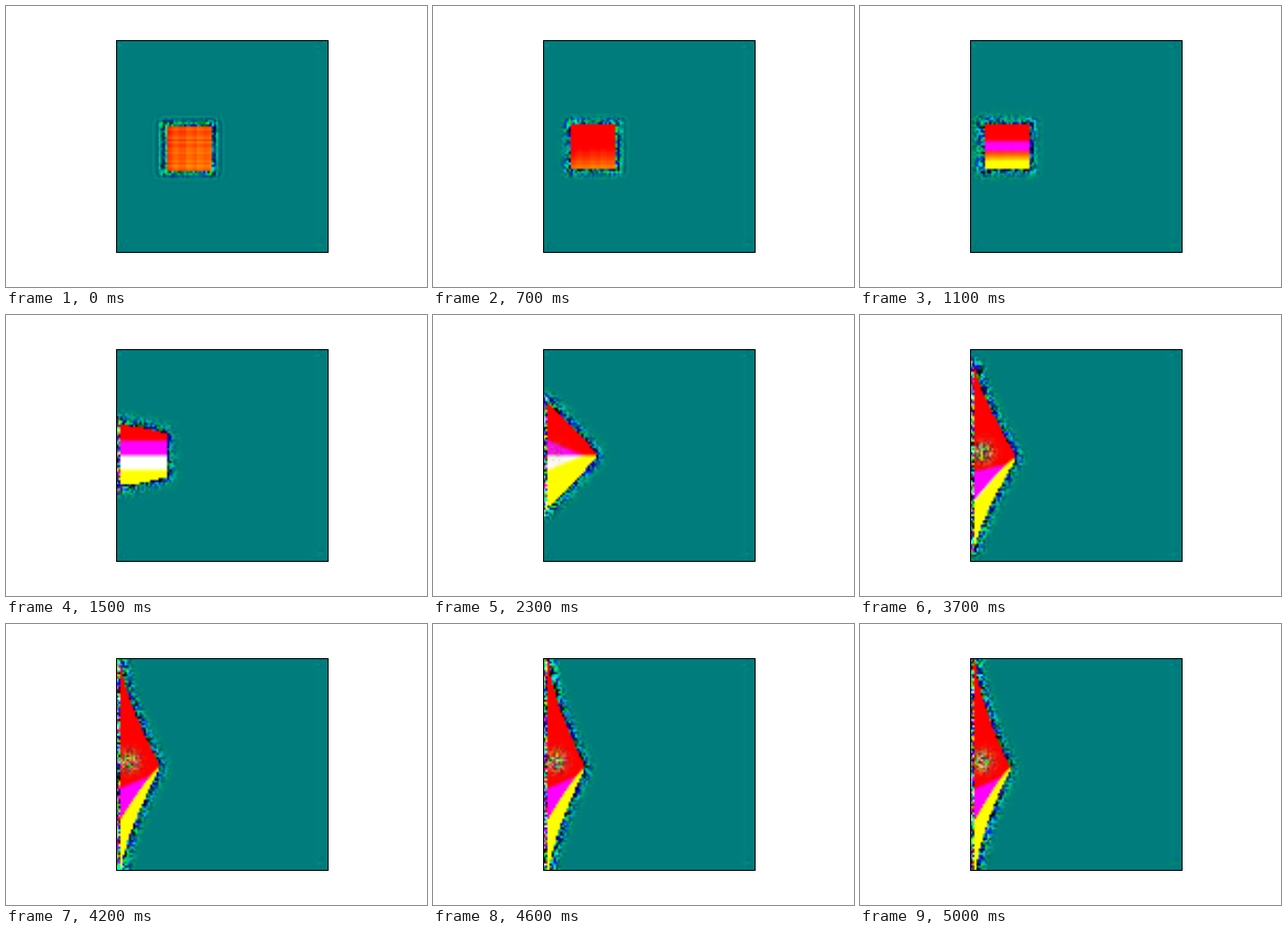
A matplotlib script for the animation above (5.1 s loop, 432 by 288 pixels).

```python
import numpy as np
import matplotlib.pyplot as plt
from matplotlib.animation import FuncAnimation

W, H, DPI = 432, 288, 72
FRAMES, STEP = 51, 100
N = 100
LEFT, TOP, SIDE = 112.68, 34.56, 217.44
CELL = SIDE / N
BASE = 0.488
WALL, START, BLOCK = 118, 164, 46
SPEED = 3.3
HIT = (START - WALL) / SPEED

cells = (np.arange(N) + 0.5) * CELL
X, Y = np.meshgrid(LEFT + cells, TOP + cells)

rng = np.random.default_rng(12)
phase = rng.uniform(0, 2 * np.pi, (3, N, N))
rate = rng.uniform(0.15, 0.5, (3, N, N))
row_tex = rng.uniform(-1, 1, N)
col_tex = rng.uniform(-1, 1, N)


def ease(t, start, end):
    u = np.clip((t - start) / (end - start), 0, 1)
    return u * u * (3 - 2 * u)


def bell(d, width):
    return np.exp(-(d / width) ** 2)


class Block:
    """Outline of the block: a square that flattens along the wall."""

    def __init__(self, t):
        self.left = max(WALL, START - SPEED * t)
        self.tip = (self.left + BLOCK if t < HIT
                    else np.interp(t, [HIT, 20, 50], [164, 167.5, 153]))
        self.cy = 146 - 2 * ease(t, 0, 10) + 0.15 * max(t - 22, 0)
        self.half = min(22.5 + 2.7 * max(t - 12, 0), 110)
        self.edge = 22.5 - 20 * ease(t, HIT, 24)
        self.power = 0.6 + np.exp(-(t - 15) / 13)
        self.s = np.clip((X - self.left) / (self.tip - self.left), 0, 1)
        self.inside = ((X >= self.left) & (X <= self.tip)
                       & (np.abs(Y - self.cy) <= self.height(self.s)))

    def height(self, s):
        return self.half + (self.edge - self.half) * s ** self.power

    def distance(self):
        """Distance from every cell to the outline."""
        s = np.linspace(0, 1, 13) ** 1.5
        x, h = self.left + s * (self.tip - self.left), self.height(s)
        px = np.r_[x, x[::-1]]
        py = self.cy + np.r_[-h, h[::-1]]
        best = np.full(X.shape, 1e9)
        for x0, y0, x1, y1 in zip(px, py, np.roll(px, -1), np.roll(py, -1)):
            dx, dy = x1 - x0, y1 - y0
            u = np.clip(((X - x0) * dx + (Y - y0) * dy)
                        / (dx * dx + dy * dy), 0, 1)
            best = np.minimum(best, np.hypot(X - x0 - u * dx, Y - y0 - u * dy))
        return best


def background():
    """Teal field with faint ripples in the corners and on the right."""
    g = np.full((N, N), BASE)
    b = np.full((N, N), BASE)
    for field, ripple in ((g, phase[0]), (b, phase[1])):
        field[3:97, 94:96] += 0.012
        for cx in (118, 321):
            for cy in (41, 245):
                spot = bell(np.hypot(X - cx, Y - cy), 5)
                field += 0.07 * spot * np.sin(ripple)
    return g, b


def outside_colours(t, block, noise):
    """Ringing around the block: stripes at first, speckle later."""
    n0, n1, n2 = noise
    d = block.distance()
    late = min(t / HIT, 1)
    early = 1 - late
    g, b = background()

    gap_x = np.abs(X - (block.left + block.tip) / 2) - BLOCK / 2
    gap_y = np.abs(Y - block.cy) - block.half
    corner = bell(np.hypot(gap_x, gap_y), 7)
    beside = gap_x > gap_y
    wave = np.cos(2 * np.pi * d / 6.5) * bell(d, 9)
    force = early * np.where(beside, 0.6, 0.28)
    turn = ease(t, 0, 8) * np.where(X < block.left, -1, 0.5)
    g += force * wave * np.where(beside, 0.8 + turn, -1)
    b += force * wave * np.where(beside, 0.2 - 0.5 * turn, 0.8)

    # Rough by the wall, smoother towards the tip
    rough = 0.5 + 0.5 * np.exp(-np.clip(X - WALL, 0, None) / 14)
    width = 5.5 + 4 * late * rough
    speckle = bell(d, width) * (late * rough
                                + early * np.clip(1.3 * corner + 0.35, 0, 1))
    edge = late * bell(d, 3.2)
    ring = late * bell(d - 6, 2.5)
    g += 0.9 * speckle * n0 - 0.4 * edge + 0.04 * ring
    b += 0.9 * speckle * n1 - 0.1 * edge + 0.12 * ring
    r = 2 * late * speckle * np.clip(n2 - 0.8, 0, 1)
    halo = 0.03 * late * bell(d - 11, 4)
    g += halo
    b -= halo

    strip = ease(t, 11, 17) * ((X < WALL) & (np.abs(Y - block.cy)
                                             < block.half + 10))
    r += strip * (0.1 + 0.9 * n2)
    g += strip * 0.6 * n0
    b += strip * 0.6 * n1
    return r, g, b


def inside_colours(t, block, noise, shift):
    """Colour bands that sharpen, tilt down the wall and swirl."""
    n0, n1, n2 = noise
    early = max(1 - t / HIT, 0)
    s, y = block.s, Y - block.cy
    sink = ease(t, 24, 42)

    slope = min(0.003 * np.exp(0.3 * t), 0.5)
    g = 0.5 + slope * (y - 46 * early - 52 * sink * (1 - s) ** 1.2)
    plaid = row_tex[:, None] + np.roll(col_tex, shift)
    g += early * (0.1 * plaid - 0.2 * bell(X - block.left, 4))

    band = 20 * ease(t, 8, HIT) * (1 - s * ease(t, 15, 23)) - 5
    b = 0.5 + 0.25 * (band - np.abs(y - 36 * sink * (1 - s)))
    b += (X < WALL + 4.5) & (Y < TOP + 3 * (t - 38))

    swirl = ease(t, 20, 31) * bell(np.hypot(X - 126, Y - 141), 10)
    swirl = np.clip(1.4 * swirl, 0, 1)
    r = 1 - swirl * (0.4 + 0.45 * n2)
    g = np.clip(g, 0, 1) * (1 - swirl) + swirl * (0.5 + 0.4 * n0)
    b = np.clip(b, 0, 1) * (1 - swirl) + swirl * (0.25 + 0.35 * n1)
    return r, g, b


def picture(t):
    block = Block(t)
    shift = int(round((block.left - START) / CELL))
    noise = np.roll(np.sin(phase + rate * t), shift, axis=2)
    inner = np.dstack(inside_colours(t, block, noise, shift))
    outer = np.dstack(outside_colours(t, block, noise))
    return np.clip(np.where(block.inside[..., None], inner, outer), 0, 1)


fig = plt.figure(figsize=(W / DPI, H / DPI), dpi=DPI, facecolor="white")
ax = fig.add_axes([LEFT / W, 1 - (TOP + SIDE) / H, SIDE / W, SIDE / H])
ax.set_xticks([])
ax.set_yticks([])
for spine in ax.spines.values():
    spine.set_linewidth(1)
image = ax.imshow(picture(0), interpolation="bilinear", aspect="auto")


def draw(i):
    image.set_data(picture(i))
    return [image]


anim = FuncAnimation(fig, draw, frames=FRAMES, interval=STEP,
                     repeat=True, repeat_delay=0)
plt.show()
```
